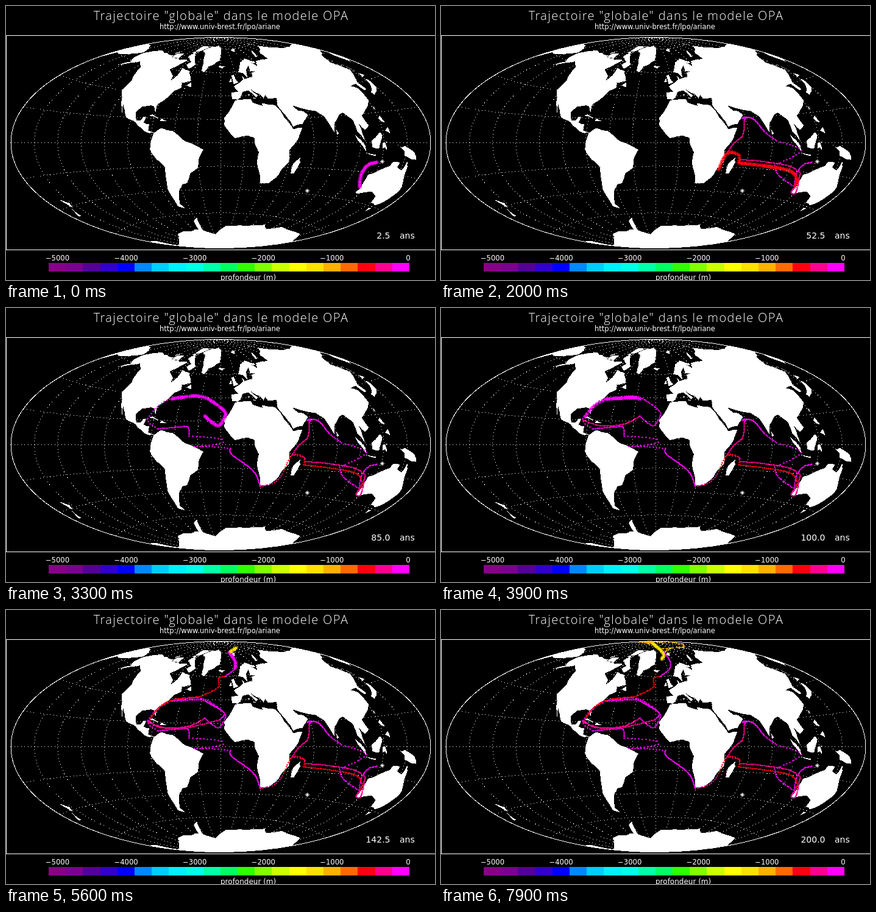
Write an HTML page that moves like this. It is 704 by 450 pixels and loops after 8 s.

```html
<!DOCTYPE html>
<html lang="fr">
<head>
<meta charset="utf-8">
<title>Trajectoire</title>
<style>
html, body { margin: 0; width: 100%; height: 100%; overflow: hidden; background: #000; }
svg { display: block; }
text { fill: #fff; font-family: "DejaVu Sans", sans-serif; }
.title { font: 300 20px "Open Sans", sans-serif; letter-spacing: 1.4px; }
.crisp { shape-rendering: crispEdges; }
.line { fill: none; stroke: #fff; }
</style>
</head>
<body>
<svg width="704" height="450" viewBox="0 0 704 450">
  <rect width="704" height="450"/>
  <text class="title" x="353" y="23" text-anchor="middle">Trajectoire "globale" dans le modele OPA</text>
  <text x="351" y="38" font-size="11.5" text-anchor="middle">http://www.univ-brest.fr/lpo/ariane</text>
  <g class="crisp">
    <path class="line" d="M704 48.5H.5V400.5H704"/>
    <path id="grid" class="line" stroke-dasharray="1 4.5"/>
    <path id="land" fill="#fff"/>
    <ellipse class="line" cx="352.5" cy="224.5" rx="344.5" ry="173"/>
    <g id="trail" fill="none"></g>
    <path id="stars" class="line"/>
    <g id="bar"></g>
  </g>
  <g id="ticks" font-size="11.6" text-anchor="middle"></g>
  <text x="352" y="450" font-size="12">profondeur (m)</text>
  <text id="years" x="630.5" y="382" font-size="14" text-anchor="end"></text>
  <text x="646" y="382" font-size="14">ans</text>
</svg>
<script>
const STEP = 100, STEPS = 80, TAIL = 4;
const $ = id => document.getElementById(id);
const add = (parent, tag, attrs) => {
  const el = document.createElementNS("http://www.w3.org/2000/svg", tag);
  for (const k in attrs) el.setAttribute(k, attrs[k]);
  return parent.appendChild(el);
};
const points = s => s.trim().split(/\s*,\s*/).map(p => p.split(" ").map(Number));
const clamp = (v, lo, hi) => Math.min(hi, Math.max(lo, v));

let seed = 7;
const random = () => (seed = seed * 16807 % 2147483647) / 2147483647;

// Aitoff projection centred on 20 degrees west
function project([lon, lat]) {
  const f = lat * Math.PI / 180, h = (lon + 20) * Math.PI / 360;
  const a = Math.acos(Math.cos(f) * Math.cos(h));
  const k = a < 1e-6 ? 1 : a / Math.sin(a);
  return [352.5 + 109.66 * 2 * Math.cos(f) * Math.sin(h) * k,
          224.5 - 110.13 * Math.sin(f) * k];
}
const toPath = pts => "M" + pts.map(p => project(p).map(v => v.toFixed(1)).join(" ")).join("L");

// Split every side at a slightly displaced midpoint, for a ragged coast
function roughen(pts) {
  return pts.flatMap((p, i) => {
    const q = pts[(i + 1) % pts.length];
    const size = .12 * Math.min(10, Math.hypot(q[0] - p[0], q[1] - p[1]));
    const mid = j => (p[j] + q[j]) / 2 + (random() - .5) * size;
    return [p, [clamp(mid(0), -200, 160), clamp(mid(1), -90, 90)]];
  });
}

// Key points of each coast: longitude and latitude
const coasts = [
  // North America
  `-168 66,-156 71,-128 70,-96 68,-90 69,-82 69,-87 65,-94 60,-82 55,-80 51,-77 56,-78 62,-65 60,-56 52,-66 50,
  -64 46,-70 43,-75 36,-81 31,-80 25,-84 30,-94 29,-98 24,-95 18,-91 18,-90 21,-87 21,-88 16,-83 15,-83 10,-77 8,
  -83 8,-95 16,-105 20,-114 31,-110 23,-117 33,-124 40,-124 48,-135 58,-147 61,-164 55,-158 59,-165 62`,
  // Arctic islands, Greenland, Iceland, Caribbean
  "-62 66,-68 62,-77 65,-73 68,-89 71,-89 74,-80 74", "-117 69,-102 69,-106 73,-118 72",
  "-62 82,-75 78,-90 76,-92 81", "-80 75,-92 75,-92 76", "-125 72,-120 74,-117 73", "-59 48,-53 47,-55 51",
  "-73 78,-60 76,-51 68,-48 61,-43 60,-40 65,-22 70,-18 80,-30 83,-55 82", "-24 65,-18 63,-14 65,-22 66",
  "-85 22,-82 23,-74 20", "-74 18,-73 20,-68 18",
  // South America
  `-78 8,-72 12,-62 10,-50 1,-35 -6,-39 -13,-41 -22,-48 -26,-53 -34,-58 -35,-62 -39,-66 -45,-69 -51,-66 -55,
  -73 -53,-74 -38,-70 -20,-76 -14,-81 -5,-80 1`,
  // Africa
  `-6 36,10 37,11 34,20 31,20 33,32 31,37 21,43 11,51 12,47 4,39 -6,40 -16,35 -22,32 -29,26 -34,18 -34,12 -17,
  13 -8,9 0,9 4,4 6,-8 4,-17 15,-17 21,-10 30`,
  "49 -12,50 -16,47 -25,44 -25,44 -17",
  // Eurasia
  `-9 43,-1 43,-5 48,8 54,8 57,10 54,20 55,23 59,30 60,22 60,25 65,17 61,14 55,11 59,5 60,14 68,28 71,41 67,33 67,
  38 64,44 68,68 68,72 73,104 78,130 71,160 70,160 62,143 59,136 55,140 48,128 40,129 35,126 35,125 40,118 39,
  122 37,121 28,110 21,106 19,109 12,105 9,101 13,104 1,98 8,97 16,91 22,87 21,80 15,78 8,73 20,67 25,57 27,
  48 30,51 26,56 25,59 22,52 15,43 13,35 28,34 31,36 37,27 37,26 40,23 37,20 41,13 45,18 40,16 38,10 44,3 43,
  -2 37,-9 37`,
  "160 60,156 57,156 51,160 53", "-200 70,-180 69,-170 66,-189 60,-196 60,-200 54",
  "52 71,56 71,69 77,56 74", "11 79,18 77,27 80", "95 80,105 79,97 81", "-5 50,1 51,-3 58,-6 57", "-10 52,-6 52,-7 55",
  "12 38,15 38,15 37", "8 41,10 41,9 39",
  // Asian islands
  "80 10,82 7,80 6", "95 6,104 -2,105 -6,98 1", "105 -7,114 -8,114 -9", "109 1,117 7,119 5,116 -4,110 -3",
  "119 0,125 1,121 0,123 -5,121 -3,119 -4", "120 16,122 18,124 13,121 14", "122 8,125 10,126 6",
  "131 -1,135 -3,138 -2,147 -6,150 -10,143 -9,139 -8,138 -5", "120 23,122 25,121 22",
  "130 33,136 36,140 41,142 40,140 35,131 31", "140 42,142 45,145 43", "142 46,142 54,143 49",
  // Oceania
  `114 -22,116 -32,115 -34,118 -35,130 -32,137 -34,140 -38,147 -39,150 -37,153 -28,146 -19,145 -15,143 -11,141 -17,
  136 -15,137 -12,131 -12,129 -15,122 -18`,
  "145 -41,148 -41,147 -43", "-187 -35,-182 -38,-185 -41", "-187 -41,-190 -46,-193 -46", "-156 20,-155 19,-156 19",
  // Antarctica
  `-200 -70,-190 -72,-196 -78,-158 -77,-130 -74,-100 -73,-70 -73,-66 -66,-57 -63,-62 -74,-35 -78,-10 -71,40 -69,
  60 -67,72 -70,90 -66,135 -66,160 -70,160 -90,-200 -90`
];
$("land").setAttribute("d", coasts.map(c => toPath(roughen(roughen(points(c)))) + "Z").join(""));

const sweep = (from, to, fn) => {
  const pts = [];
  for (let v = from; v <= to; v += 5) pts.push(fn(v));
  return toPath(pts);
};
let grid = "";
for (let lon = -180; lon < 160; lon += 20) grid += sweep(-90, 90, lat => [lon, lat]);
for (let lat = -80; lat <= 80; lat += 20) grid += sweep(-200, 160, lon => [lon, lat]);
$("grid").setAttribute("d", grid);

const palette = ("#808 #7c0092 #509 #3300c8 #00f #08f #0cf #00f0ff #00ffe8 #00ffa8 #00ff60 " +
  "#30ff00 #80ff00 #cf0 #ff0 #ffe000 #ffb000 #ff6a00 #ff0010 #ff0090 #f0f").split(" ");
const [yellow, orange, , red, pink, magenta] = palette.slice(15);
const edge = i => Math.round(70 + i * 592 / palette.length);
palette.forEach((fill, i) =>
  add($("bar"), "rect", { x: edge(i), y: 422, width: edge(i + 1) - edge(i), height: 14, fill }));
for (let i = 5; i >= 0; i--)
  add($("ticks"), "text", { x: i ? 647.5 - i * 112.6 : 660, y: 418 }).textContent = i ? `−${i}000` : "0";

const star = (x, y) =>
  `M${x - 3} ${y + .5}h7M${x + .5} ${y - 3}v7M${x - 2} ${y - 2}l5 5M${x - 2} ${y + 3}l5 -5`;
const plus = (x, y) => `M${x - 1} ${y + .5}h3M${x + .5} ${y - 1}v3`;
$("stars").setAttribute("d", star(617, 255) + star(494, 303));

// Each leg goes on from the last one: end step, colour, marker spacing, key points
const legs = [
  [0, magenta, 2.5, "593 261,582 278,580 297"],
  [2, pink, 2, "574 306,582 305,589 274"],
  [4, pink, 2.5, "570 262,520 254,490 252"],
  [4.5, pink, 5, "488 244,469 241"],
  [6, pink, 2.5, "480 225,495 211,497 188"],
  [12, magenta, 2, "500 182,494 184,511 184,530 206"],
  [13, magenta, 3, "550 221"],
  [14, magenta, 5.5, "580 230,589 240,547 261"],
  [16, magenta, 3, "553 277,580 297"],
  [18.5, red, 2.5, "583 283,565 268,488 257"],
  [20, red, 4, "488 244,469 242,455 268"],
  [20.7, pink, 4, "442 285,417 293"],
  [23, magenta, 2, "405 267,370 240,368 230"],
  [24, magenta, 5, "333 227,308 227"],
  [25, magenta, 6, "352 222,350 214,300 210"],
  [27, magenta, 2.5, "298 195,284 195,248 198"],
  [29, magenta, 5, "232 183,250 160,268 149"],
  [32, magenta, 3, "320 145,357 168,358 180"],
  [33, magenta, 3, "347 193,326 177"],
  [35, pink, 2.5, "300 190,262 193,232 183"],
  [37, magenta, 6, "250 161,270 149"],
  [39, magenta, 3, "315 147,326 149"],
  [45, magenta, 2, "357 168,350 180"],
  [47.3, pink, 2.5, "300 192,255 193,234 182"],
  [49, red, 2.5, "250 160,275 147,317 142"],
  [51, red, 3, "347 127,348 112,358 109"],
  [53.5, magenta, 2.5, "373 98,376 85,366 69"],
  [56, yellow, 2.5, "377 62"],
  [61, orange, 6, "358 64,386 61"],
  [66, orange, 2, "398 60,397 56"],
  [69, orange, 3, "380 53"],
  [72, orange, 6, "325 52"],
  [77, orange, 2, "345 53"],
  [79, yellow, 2, "364 70,362 80"]
];

// Catmull-Rom curve through the key points, as a fine polyline
function curve(pts) {
  const at = i => pts[clamp(i, 0, pts.length - 1)], out = [];
  for (let i = 0; i < pts.length - 1; i++)
    for (let u = 0; u < 1; u += 1 / 64)
      out.push([0, 1].map(j => {
        const [a, b, c, d] = [-1, 0, 1, 2].map(k => at(i + k)[j]);
        return b + u / 2 * (c - a + u * (2 * a - 5 * b + 4 * c - d + u * (3 * (b - c) + d - a)));
      }));
  return [...out, at(pts.length)];
}

const marks = [];
let last = [611, 256], time = -1;
for (const [end, color, gap, route] of legs) {
  const line = curve([last, ...points(route)]);
  let total = 0;
  const lengths = line.map((p, i) => total += i ? Math.hypot(p[0] - line[i - 1][0], p[1] - line[i - 1][1]) : 0);
  const count = Math.round(total / gap);
  for (let k = 1; k <= count; k++) {
    const i = lengths.findIndex(s => s >= k / count * total - 1e-6);
    marks.push({ t: time + (end - time) * k / count, color, x: Math.round(line[i][0]), y: Math.round(line[i][1]) });
  }
  last = line[line.length - 1];
  time = end;
}
const layers = [magenta, pink, red, orange, yellow].map(color => ({
  color, el: add($("trail"), "path", { stroke: color })
}));

let shown = -1;
function draw(now) {
  const step = Math.floor(now / STEP) % STEPS;
  if (step === shown) return;
  shown = step;
  for (const { color, el } of layers)
    el.setAttribute("d", marks.filter(m => m.color === color && m.t <= step + 1e-6)
      .map(m => (m.t > step - TAIL ? star : plus)(m.x, m.y)).join(""));
  $("years").textContent = ((step + 1) * 2.5).toFixed(1);
}
const start = performance.now();
function tick() {
  draw(performance.now() - start);
  requestAnimationFrame(tick);
}
tick();
</script>
</body>
</html>
```
